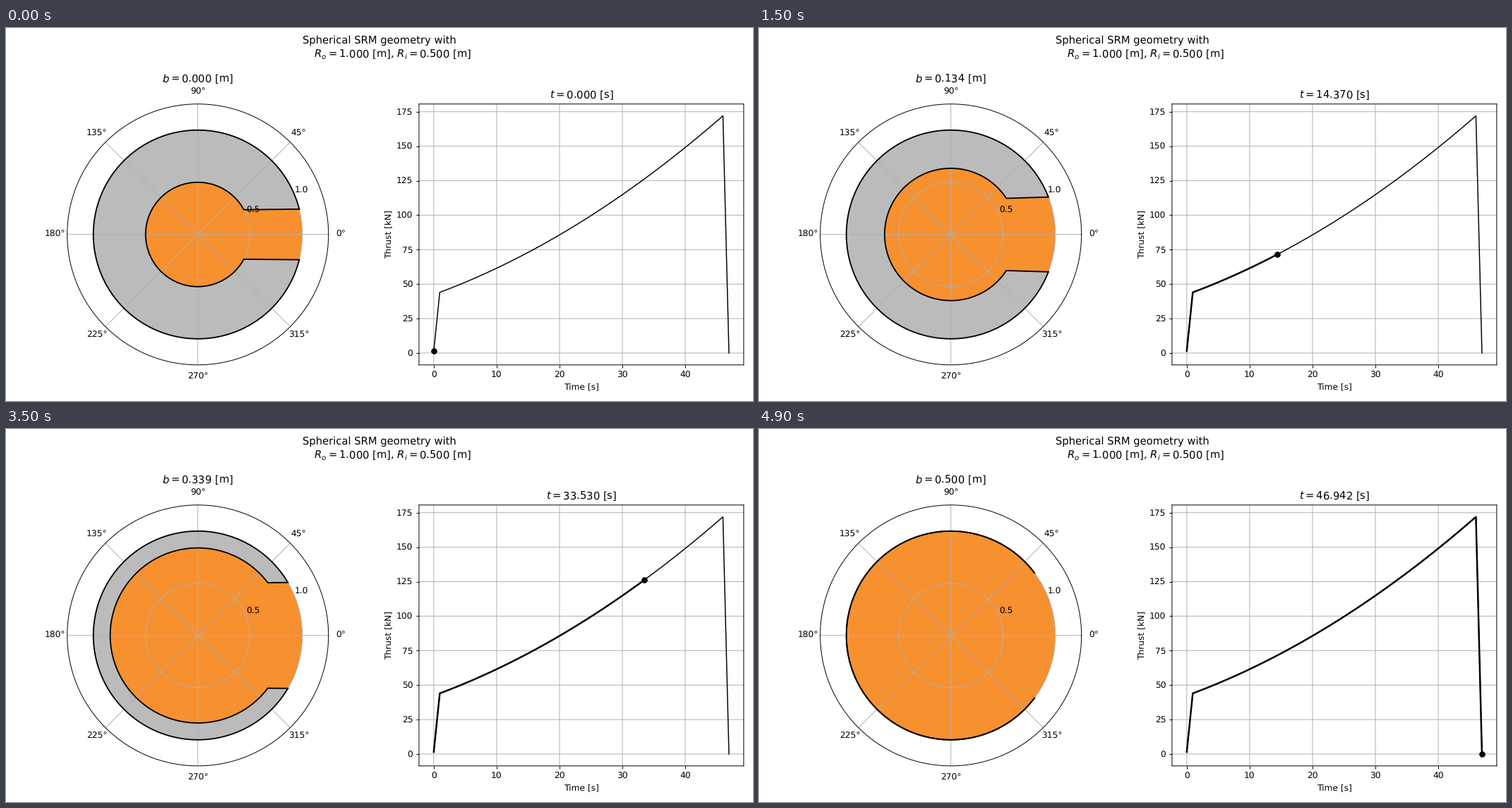
Write a matplotlib script that moves like this. It is 1058 by 529 pixels and loops after 5000 ms.

```python
import numpy as np
import matplotlib.pyplot as plt
from matplotlib.animation import FuncAnimation

# Place lines and letters at sub-pixel positions.
plt.rcParams.update({"path.snap": False, "text.hinting": "no_hinting"})

W, H = 1058, 529
FRAMES, INTERVAL = 50, 100
STEP = 0.958                      # burn time per frame, s
R_OUT, R_IN, SLOT = 1.0, 0.5, 0.25
GRAY, ORANGE = "#bbbbbb", "#f7902f"
TOP, BOTTOM = 107.8, 477.8        # both axes, px

time = STEP * np.arange(FRAMES)
burn = np.minimum(0.00873 * time + 4.1e-5 * time**2, R_OUT - R_IN)
thrust = 42.385 + 1.6617 * time + 0.02516 * time**2
thrust[0], thrust[-1] = 1.5, 0.0


def arc(start, radius):
    """Arc the long way round, leaving a gap of +-start about zero."""
    theta = np.linspace(start, 2 * np.pi - start, 361)
    return np.array([theta, np.full_like(theta, radius)])


def grain(b):
    """Case wall, and the burning surface with both slot walls."""
    wall = arc(np.arctan(SLOT + b), R_OUT)
    bore = arc(np.arctan(1.076 * (SLOT + b) / (R_IN + b)), R_IN + b)
    return wall, np.hstack([wall[:, :1], bore, wall[:, -1:]])


def box(left, right):
    """Figure fractions of an axes box given in pixels."""
    return [left / W, 1 - BOTTOM / H, (right - left) / W, (BOTTOM - TOP) / H]


fig = plt.figure(figsize=(12, 6), dpi=88.17)
fig.suptitle("Spherical SRM geometry with\n" + " " * 8
             + f"$R_o = {R_OUT:.3f}$ [m], $R_i = {R_IN:.3f}$ [m]")

polar = fig.add_axes(box(86.7, 456.7), projection="polar")
polar.fill(*arc(0, R_OUT), color=ORANGE, lw=0)
body, = polar.fill(*arc(0, R_OUT), color=GRAY, lw=0)
wall_line, = polar.plot([], [], color="black", lw=1.5)
surface_line, = polar.plot([], [], color="black", lw=1.5)
polar.set_rlim(0, 1.25)
polar.set_rticks([0.5, 1.0])

chart = fig.add_axes(box(584.9, 1044.8))
chart.plot(time, thrust, color="black", lw=1.2)
trail, = chart.plot(time, thrust, color="black", lw=2)
dot, = chart.plot(time[:1], thrust[:1], "o", color="black")
chart.set_xlabel("Time [s]")
chart.set_ylabel("Thrust [kN]")
chart.grid()

burn_title = polar.set_title("")
time_title = chart.set_title("")


def update(i):
    wall, surface = grain(burn[i])
    wall_line.set_data(*wall)
    surface_line.set_data(*surface)
    body.set_xy(np.hstack([wall, surface[:, ::-1]]).T)
    trail.set_data(time[:i + 1], thrust[:i + 1])
    dot.set_data(time[i:i + 1], thrust[i:i + 1])
    burn_title.set_text(f"$b = {burn[i]:.3f}$ [m]")
    time_title.set_text(f"$t = {time[i]:.3f}$ [s]")
    return body, wall_line, surface_line, trail, dot, burn_title, time_title


anim = FuncAnimation(fig, update, frames=FRAMES, interval=INTERVAL,
                     init_func=lambda: update(0), repeat=True, repeat_delay=0)
plt.show()
```
